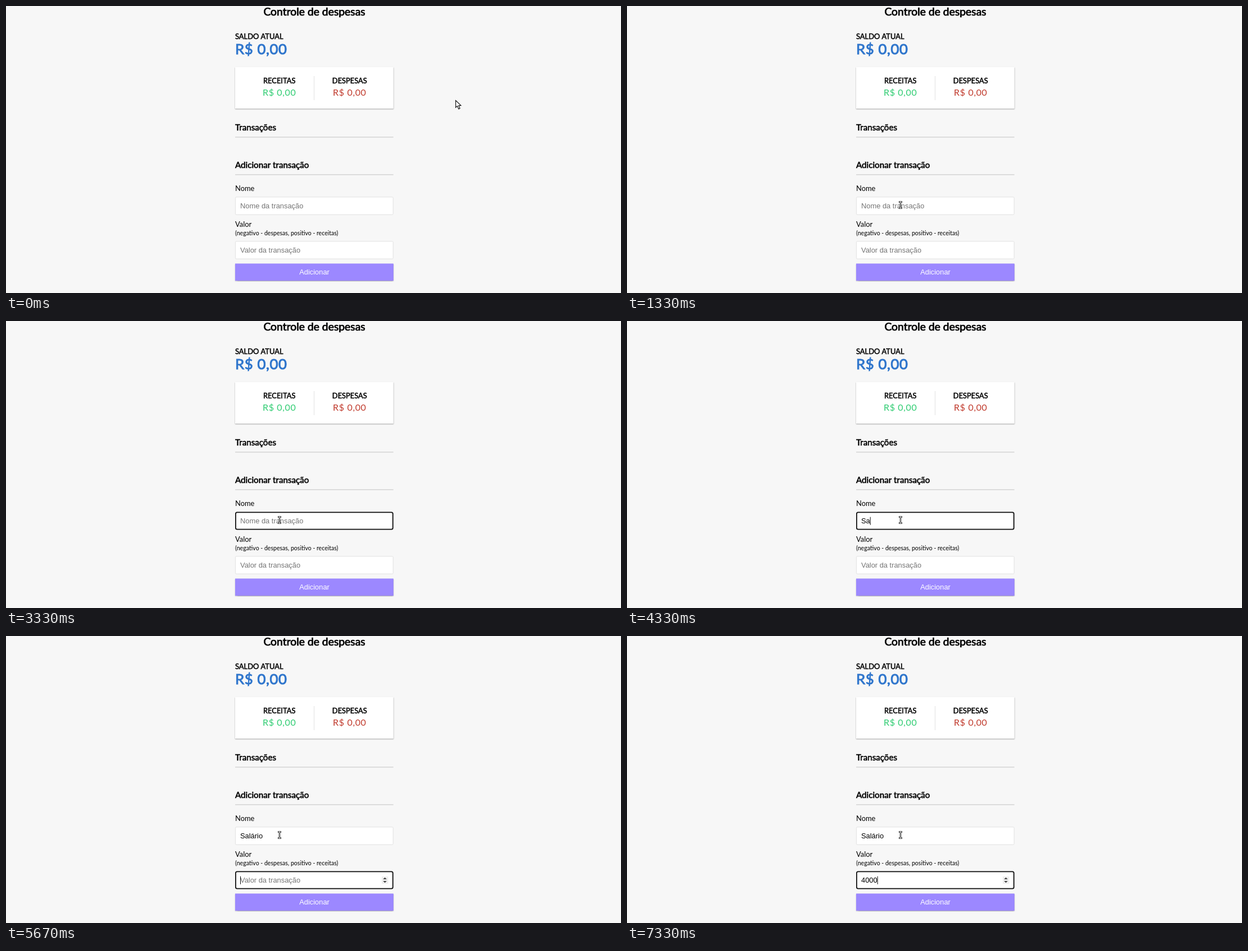
Write an HTML page with a canvas that moves like this. It is 1095x512 px and loops after 8000 ms.

```html
<!DOCTYPE html>
<html lang="pt-BR">
<head>
<meta charset="utf-8">
<title>Controle de despesas</title>
<style>
  html, body { margin: 0; width: 100%; height: 100%; overflow: hidden; background: #f7f7f7; }
  canvas { display: block; }
</style>
</head>
<body>
<canvas id="stage" width="1095" height="512"></canvas>
<script>
const ctx = document.getElementById('stage').getContext('2d');
const LOOP = 8000;
const SCALE = 0.805;
const LEFT = 408, WIDTH = 281.7, MIDDLE = 549;
const LATO = 'Lato, sans-serif';
const ARIAL = '"Liberation Sans", Arial, sans-serif';

// Each step overrides part of the state from its time on.
const steps = [
  { at: 0, pointer: 'arrow', x: 800, y: 167.5, name: '', value: '', focus: '', caret: false, hover: false },
  { at: 330, x: 785, y: 193 },
  { at: 670, x: 605, y: 376 },
  { at: 1000, pointer: 'beam', x: 499, y: 430, hover: true },
  { at: 1330, x: 487, y: 355, hover: false },
  { at: 1670, focus: 'name', caret: true },
  { at: 2330, caret: false },
  { at: 3000, caret: true },
  { at: 3330, caret: false },
  { at: 3670, name: 'S', caret: true },
  { at: 4330, name: 'Sa' },
  { at: 4670, name: 'Sal' },
  { at: 5000, name: 'Salá' },
  { at: 5330, name: 'Salário' },
  { at: 5670, focus: 'value', caret: true },
  { at: 6330, caret: false },
  { at: 6670, value: '4', caret: true },
  { at: 7000, value: '400' },
  { at: 7330, value: '4000' }
];

function stateAt(time) {
  return Object.assign({}, ...steps.filter(step => step.at <= time));
}

// Sizes are in page pixels; positions are in stage pixels.
function text(str, x, y, size, { color = '#000', font = LATO, align = 'left', bold = false, spacing = 0 } = {}) {
  const px = size * SCALE;
  ctx.font = `${px}px ${font}`;
  ctx.textAlign = align;
  ctx.letterSpacing = `${spacing * SCALE}px`;
  ctx.fillStyle = color;
  ctx.fillText(str, x, y);
  if (bold) {
    // Thickened regular weight keeps the regular letter widths.
    ctx.strokeStyle = color;
    ctx.lineWidth = px / 26;
    ctx.miterLimit = 3;
    ctx.strokeText(str, x, y);
  }
  ctx.letterSpacing = '0px';
}

function rect(x, y, w, h, color) {
  ctx.fillStyle = color;
  ctx.fillRect(x, y, w, h);
}

function raisedBox(y, h, color) {
  ctx.save();
  ctx.shadowOffsetY = 1;
  for (const [blur, alpha] of [[3, 0.12], [2, 0.24]]) {
    ctx.shadowBlur = blur * SCALE;
    ctx.shadowColor = `rgba(0, 0, 0, ${alpha})`;
    rect(LEFT, y, WIDTH, h, color);
  }
  ctx.restore();
}

function polygon(points, fill) {
  ctx.beginPath();
  points.forEach(([x, y]) => ctx.lineTo(x, y));
  ctx.closePath();
  ctx.fillStyle = fill;
  ctx.fill();
}

function heading(str, baseline) {
  text(str, LEFT, baseline, 18.85, { bold: true });
  rect(LEFT, baseline + 11.5, WIDTH, 0.9, '#bbb');
}

function total(label, x, color) {
  text(label, x, 138, 16, { align: 'center', bold: true });
  text('R$ 0,00', x, 160, 20, { align: 'center', color, spacing: 0.75 });
}

function spinner() {
  rect(669, 429, 11.5, 13, '#efefef');
  polygon([[671.3, 434], [674.6, 430.7], [677.9, 434]], '#444');
  polygon([[671.3, 437], [674.6, 440.3], [677.9, 437]], '#444');
}

function outline(y, inset, radius, width, color) {
  ctx.beginPath();
  ctx.roundRect(LEFT + inset, y + inset, WIDTH - 2 * inset, 32.2 - 2 * inset, radius);
  ctx.strokeStyle = color;
  ctx.lineWidth = width;
  ctx.stroke();
}

function field(y, str, hint, focused, caret, spin) {
  rect(LEFT + 0.5, y + 0.5, WIDTH - 1, 31.2, '#fff');
  outline(y, 0.45, 1.6, 0.9, '#dedede');
  if (spin) spinner();
  text(str || hint, 417, Math.round(y + 20.6), 16, { font: ARIAL, color: str ? '#000' : '#757575' });
  if (!focused) return;
  if (caret) rect(417 + ctx.measureText(str).width, y + 9.2, 0.95, 14.3, '#000');
  outline(y, 0.9, 2.6, 1.8, '#101010');
}

function arrow() {
  polygon([[0.7, 1], [0.7, 13.6], [3.6, 10.9], [5.9, 16.2], [8.2, 15.2], [6, 10.1], [10, 9.9]], '#fff');
  ctx.strokeStyle = '#000';
  ctx.lineWidth = 1.1;
  ctx.stroke();
}

function beam() {
  ctx.beginPath();
  for (const y of [-5.6, 5.6]) {
    ctx.moveTo(-1.7, y);
    ctx.lineTo(1.7, y);
  }
  ctx.moveTo(0, -5.6);
  ctx.lineTo(0, 5.6);
  ctx.lineCap = 'square';
  for (const [color, width] of [['#000', 2.5], ['#fff', 1]]) {
    ctx.strokeStyle = color;
    ctx.lineWidth = width;
    ctx.stroke();
  }
}

function pointer({ pointer, x, y }) {
  ctx.save();
  ctx.translate(x, y);
  if (pointer === 'arrow') arrow();
  else beam();
  ctx.restore();
}

function draw(state) {
  rect(0, 0, 1095, 512, '#f7f7f7');
  text('Controle de despesas', MIDDLE, 17, 24, { align: 'center', bold: true });
  text('SALDO ATUAL', LEFT, 59, 16, { bold: true });
  text('R$ 0,00', LEFT, 86, 32, { color: '#2e75cc', bold: true, spacing: 0.75 });

  raisedBox(109, 74, '#fff');
  rect(548.2, 125, 0.9, 43, '#dedede');
  total('RECEITAS', 486.7, '#2ecc71');
  total('DESPESAS', 611.8, '#c0392b');

  heading('Transações', 222);
  heading('Adicionar transação', 289);

  const { focus, caret } = state;
  text('Nome', LEFT, 330, 16);
  field(340.4, state.name, 'Nome da transação', focus === 'name', caret, false);
  text('Valor', LEFT, 394, 16);
  text('(negativo - despesas, positivo - receitas)', LEFT, 409, 13.12);
  field(419.4, state.value, 'Valor da transação', focus === 'value', caret, state.hover || focus === 'value');

  raisedBox(459.7, 30.4, '#9c88ff');
  text('Adicionar', MIDDLE, 479, 16, { font: ARIAL, color: '#fff', align: 'center' });
  pointer(state);
}

const start = performance.now();
function tick() {
  draw(stateAt((performance.now() - start) % LOOP));
  requestAnimationFrame(tick);
}
tick();
</script>
</body>
</html>
```
